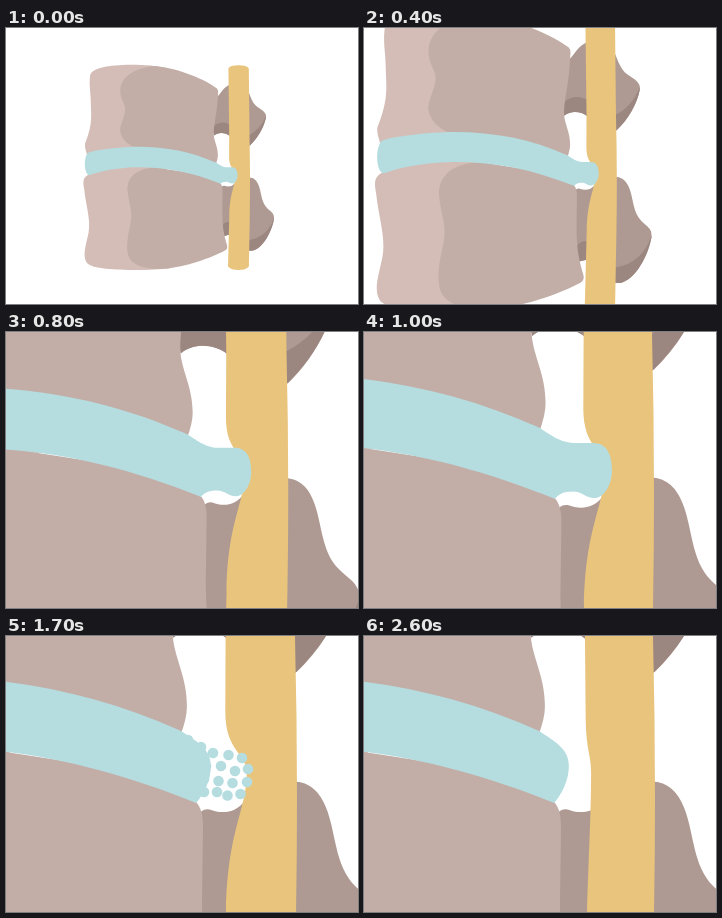
An HTML page with a canvas for the animation above (2700 ms loop, 352x276 px).

```html
<!DOCTYPE html>
<html lang="en">
<head>
<meta charset="utf-8">
<title>Disc treatment</title>
<style>
  html, body { margin: 0; width: 100%; height: 100%; overflow: hidden; background: #fff; }
  canvas { display: block; }
</style>
</head>
<body>
<canvas id="stage" width="352" height="276"></canvas>
<script>
const ctx = document.getElementById('stage').getContext('2d');
const LOOP = 2700, STEP = 100, ZOOM = 3.42;
const CENTER = [224.7, 151.2];
const DISC = '#b5dde0', ROD = '#e9c47c', LIGHT = '#d4bdb6', MID = '#c2aea7',
      PROCESS = '#ae9a92', SHADOW = '#9b8680';

const clamp = v => Math.min(1, Math.max(0, v));
const progress = (t, from, to) => clamp((t - from) / (to - from));
const mix = (a, b, k) => a + (b - a) * k;
const smooth = u => u * u * (3 - 2 * u);
const easeInOut = u => u ** 1.74 / (u ** 1.74 + (1 - u) ** 1.74);

const shape = (color, d) => ({ color, path: new Path2D(d) });
const fill = ({ color, path }) => { ctx.fillStyle = color; ctx.fill(path); };

const bones = [
  // upper process
  shape(PROCESS, `M211 69 C216 64 217 60 223 57 L240 58 L243 65 C246 73 248 77 253 80
    C258 83 261 86 259.8 90 C258 99 252 110 244 117.5 L230 120 L224 108
    C219 104 212 104 207.9 107.5 L206 100Z`),
  shape(SHADOW, `M259.8 88 C256 97 251 103 243 107 V118.3 C252 110 258 99 259.8 90Z`),
  shape(SHADOW, `M207 99 C211 94 219 93 224 97 V108 C219 104 212 104 207.9 107.5Z`),
  // lower process
  shape(PROCESS, `M215 160 Q216 157.3 218.5 157.7 C222 159 226 159 229 155 L243 149.5
    C248 149.5 251 153 252.5 157 C255.5 164 255 174 261 180 C265 184 268.5 185 268 191
    C266 203 257 221 246 222.7 L240 222 L230 215 L224 206.5 L218 208 L213 200Z`),
  shape(SHADOW, `M268 190 C264 202 256 210 243 212 V222.8 H246 C257 221 266 203 268 191Z`),
  shape(SHADOW, `M215 200 C217 195 220 193.5 224 194 V206.5 L218 208Z`),
  // upper vertebra
  shape(LIGHT, `M84 48 C85 38 112 36.5 130 36.7 Q145 36.8 160 40 L150 130 H82
    C79 120 78 117 80 113 C87 95 85 86 84.8 74 C84.5 62 83 58 84 48Z`),
  shape(MID, `M150 38 C175 41 200 52 211 60.5 Q212.5 62 212 66 C211.5 85 207 98 207.8 107.5
    C208.5 114 211.9 119 211.9 127.5 Q211.9 131 210 136 L205 140 L135 121
    C122 119 111 108 115 97 C119 85 121 82 117 74 C108 55 122 40 150 38Z`),
  // lower vertebra
  shape(LIGHT, `M84 146 C76 149 77 154 78.3 162 C80 178 85 192 82.5 205
    C80 217 76 228 81 235 C86 241 110 242 130 242 Q150 242 165 240 L160 138 H110Z`),
  shape(MID, `M150 139.5 C130 140 119 150 122 166 C123.5 178 126.5 182 124.8 194
    C122 208 119.5 218 122.5 228 C126 238 140 241.5 158 240.8 C180 239 205 230 219 222.5
    Q222 221 221 217 C218 207 216.5 200 216.3 185 L216.6 163
    C216.6 159 216 157 214.3 155.2 L205 148Z`)
];

const disc = shape(DISC, `M81 126 C82 122 118 118.6 132 118.7 C160 118.8 185 123.5 210.2 134.8
  C215 138 218.9 140 218.9 145 C218.9 149 217 153 214.6 155.8 C185 144 160 139 130 139.3
  C110 140 95 143 84 147 C79 148 77 133 81 126Z`);

const bulge = shape(DISC, `M208 133.8 C215 138 217 139.3 221 139.3 H226
  C230 139.3 231.6 142.5 231.6 147.5 C231.6 152 229 155.6 226.5 155.6
  C223.5 155.6 223 153.7 220 153.7 C217 153.7 216 154.5 214.5 155.9Z`);

// Dot centres in stage pixels at full zoom
const dots = [
  [182, 104], [195, 111], [207, 117], [222.5, 119], [236, 122],
  [200, 130], [215, 130], [229, 135], [242, 133],
  [198, 143], [212.5, 145], [226.5, 147], [241, 146],
  [198, 156], [211, 156], [221.5, 159.5], [234.5, 158]
];

// dent: 1 = pressed in by the disc, 0 = relaxed
function rod(dent) {
  const x = (relaxed, pressed) => mix(relaxed, pressed, dent);
  const low = x(224.2, 223.3), high = x(223.8, 223.1), peak = x(225.4, 229.5);
  return shape(ROD, `M222.4 40.5 Q224 37.2 232.5 37.2 Q241 37.2 242.8 40.5
    L243.5 107 Q244.5 147 243.8 188 L242.9 238.5 Q240 242 232.5 242 Q225 242 222 238.5
    L${low} 188 C${x(225, 223.6)} 164 ${peak} 158 ${peak} 147
    C${peak} 141 ${high} 141 ${high} 129 L${x(223.6, 223.2)} 107Z`);
}

function draw(t) {
  const zoom = mix(1, ZOOM, easeInOut(progress(t, 100, 1100)));
  const dent = 1 - smooth(progress(t, 1600, 2600));
  const dissolving = t >= 1250;

  ctx.setTransform(1, 0, 0, 1, 0, 0);
  ctx.fillStyle = '#fff';
  ctx.fillRect(0, 0, 352, 276);

  ctx.setTransform(zoom, 0, 0, zoom, CENTER[0] * (1 - zoom), CENTER[1] * (1 - zoom));
  bones.forEach(fill);
  fill(rod(dent));
  fill(disc);
  if (!dissolving) return fill(bulge);

  ctx.setTransform(1, 0, 0, 1, 0, 0);
  const radius = Math.max(0, 5.3 - (t - 1700) * 0.0066);
  for (const [x, y] of dots) {
    ctx.beginPath();
    ctx.arc(x, y, radius, 0, Math.PI * 2);
    ctx.fill();
  }
}

function tick() {
  const t = performance.now() % LOOP;
  draw(Math.floor(t / STEP) * STEP);
  requestAnimationFrame(tick);
}
tick();
</script>
</body>
</html>
```
